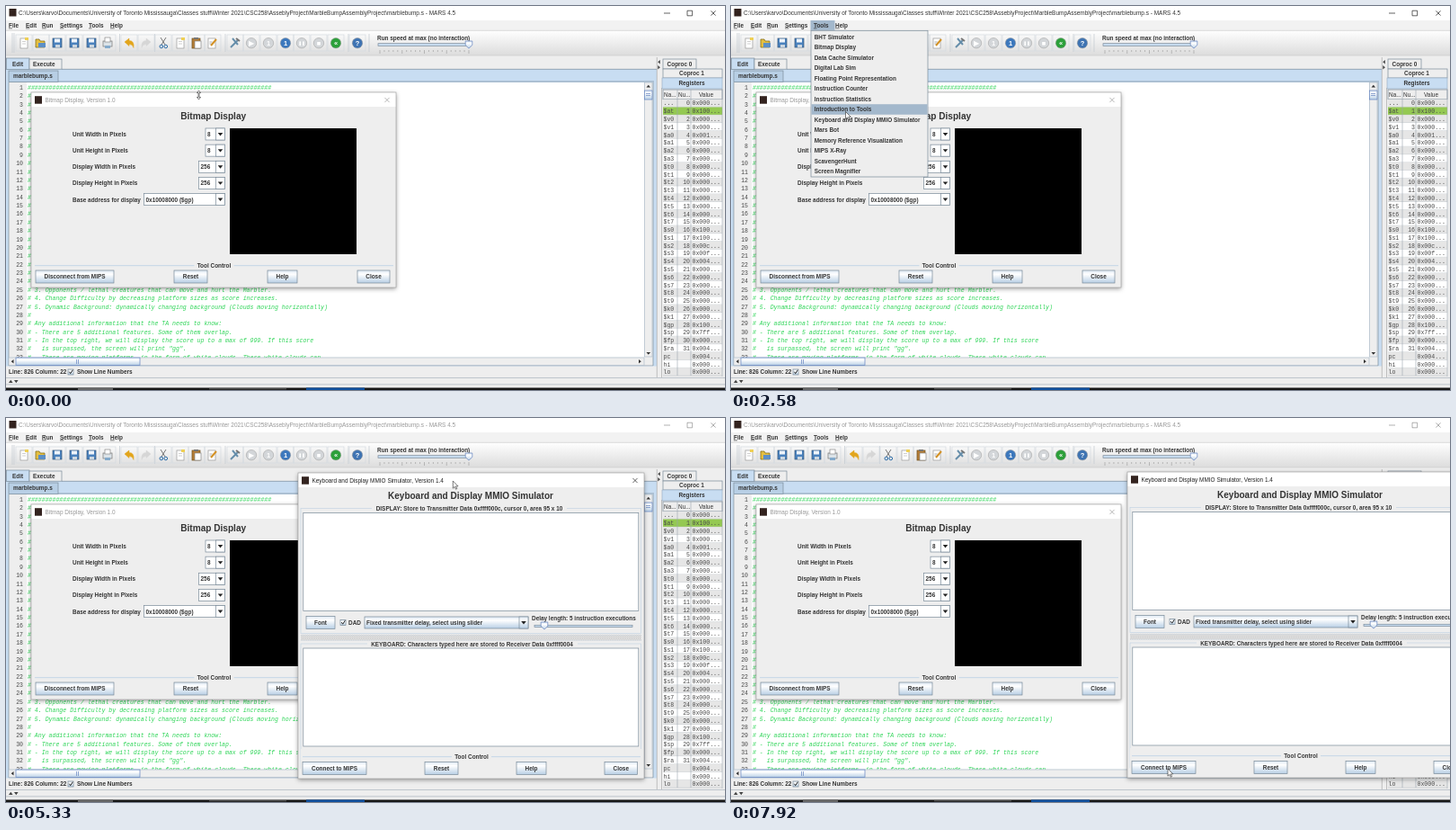
Write an HTML page that moves like this. It is 800 px wide and 427 px high and loops after 8 s.

```html
<!DOCTYPE html>
<html lang="en">
<head>
<meta charset="utf-8">
<title>Assembly editor</title>
<style>
html, body { margin: 0; width: 100%; height: 100%; overflow: hidden; background: #eee; }
svg { display: block; width: 100vw; height: 100vh; }
text { white-space: pre; font: bold 6.42px "Liberation Sans", Arial, sans-serif; fill: #333; }
text.plain { font-weight: normal; }
text.mono { font: 6.55px "Liberation Mono", "Courier New", monospace; fill: #4a4a4a; }
text.code { font-style: italic; fill: #2bd455; }
.u { text-decoration: underline; }
</style>
</head>
<body>
<svg id="stage" viewBox="0 0 800 427" preserveAspectRatio="none">
  <defs>
    <linearGradient id="ocean" x2="0" y2="1">
      <stop stop-color="#dde8f3"/><stop offset=".3" stop-color="#fff"/><stop offset="1" stop-color="#b8cfe5"/>
    </linearGradient>
    <linearGradient id="bar" x2="0" y2="1"><stop stop-color="#fff"/><stop offset="1" stop-color="#dcdcdc"/></linearGradient>
    <pattern id="bumps" width="2" height="2" patternUnits="userSpaceOnUse">
      <rect width="2" height="2" fill="#eee"/><rect width="1" height="1" fill="#bbb"/><rect x="1" y="1" width="1" height="1" fill="#ccc"/>
    </pattern>
    <filter id="shadow" x="-10%" y="-10%" width="120%" height="120%">
      <feDropShadow dx="0" dy="1.5" stdDeviation="2.5" flood-opacity=".4"/>
    </filter>
  </defs>
</svg>
<script>
const EDGE = "#7a8a99", BLUE = "#c8ddf2", PICK = "#a3b8cc";
const stage = document.getElementById("stage");
const rect = (x, y, w, h, fill, extra = "") => `<rect x="${x}" y="${y}" width="${w}" height="${h}" fill="${fill}" ${extra}/>`;
const box = (x, y, w, h, fill, stroke = EDGE) => rect(x, y, w, h, fill, `stroke="${stroke}" stroke-width=".7"`);
const path = (d, stroke, width = .7, fill = "none") => `<path d="${d}" fill="${fill}" stroke="${stroke}" stroke-width="${width}"/>`;
// y is the middle of the line of text
const text = (x, y, str, { cls = "", size = 6.42, anchor = "start", fill = "" } = {}) =>
  `<text x="${x}" y="${y + size * .36}" class="${cls}" text-anchor="${anchor}" style="font-size:${size}px;${fill && "fill:" + fill}">${str}</text>`;
const mid = (x, y, str, size = 6.42, cls = "") => text(x, y, str, { anchor: "middle", size, cls });
const mono = (x, y, str, anchor = "start", cls = "mono") => text(x, y, str, { cls, size: 6.55, anchor });
const button = (x, y, w, h, label) => box(x, y, w, h, "url(#ocean)") + mid(x + w / 2, y + h / 2, label);
const range = (n, fn) => Array.from({ length: n }, (_, i) => fn(i)).join("");
const cross = (x, y, color) => path(`M${x - 2.6} ${y - 2.6}l5.2 5.2m0-5.2l-5.2 5.2`, color, .7);
const check = (x, y) => box(x, y, 6, 6, "url(#ocean)") + path(`M${x + 1.3} ${y + 2.7}l1.4 2 2.6-4`, "#222", 1);
const combo = (x, y, w, value, fill = "#fff") => box(x, y, w, 13, fill) + box(x + w - 10, y, 10, 13, fill) +
  path(`M${x + w - 7.8} ${y + 5}h5.6l-2.8 3.4z`, "none", 0, "#222") + text(x + 2, y + 6.7, value);
const thumb = (x, y) => path(`M${x - 3.8} ${y - 4}h7.6v4.5l-3.8 3.6-3.8-3.6z`, "#6382bf", .7, "url(#ocean)");
const ruled = (x1, x2, y, label, half) => path(`M${x1} ${y}H${(x1 + x2) / 2 - half}M${(x1 + x2) / 2 + half} ${y}H${x2}`, "#b8cfe5", .8) +
  mid((x1 + x2) / 2, y, label);

function mainWindow() {
  const name = "marblebump.s";
  const title = String.raw`C:\Users\karvo\Documents\University of Toronto Mississauga\Classes stuff\Winter 2021\CSC258\AsseblyProject\MarbleBumpAssemblyProject\ `.trim() + name + " - MARS 4.5";
  const menus = { File: 3, Edit: 22, Run: 40, Settings: 60, Tools: 92, Help: 116 };
  return rect(0, 0, 800, 427, "#eee") + rect(0, 0, 800, 16, "#fff") + rect(3.5, 3, 8, 8.5, "#33231f") +
    group("title", text(14, 7.5, title, { cls: "plain", size: 6.48 }) +
      path("M732 8h7M758 5.2h5.6v5.6h-5.6z", "#222") + cross(787, 8, "#222")) +
    rect(0, 16, 800, 11, "#f2f2f2") + rect(88.5, 16, 27, 11, PICK, 'id="toolsTitle"') +
    Object.entries(menus).map(([m, x]) => text(x, 21.3, `<tspan class="u">${m[0]}</tspan>${m.slice(1)}`)).join("") +
    toolbar() + editor(name) + registers() + bottom();
}

function toolbar() {
  const icons = [
    [20, "page"], [39, "folder"], [57, "disk"], [76, "disk"], [95, "disk"], [113, "print"],
    [137, "undo", "#e2a51c"], [156, "redo", "#d6d6d6"], [175, "cut"], [194, "page"], [212, "paste"], [230, "edit"],
    [255, "tool"], [273, "dot", "#d3d6d9", "▶"], [292, "dot", "#d3d6d9", "1"], [311, "dot", "#3c78bd", "1"],
    [329, "dot", "#d3d6d9", "❚❚"], [348, "dot", "#d3d6d9", "■"], [367, "dot", "#2ca03a", "«"], [391, "dot", "#3f74b3", "?"]
  ];
  const shapes = {
    page: x => box(x - 4, 36, 8, 11, "#fff", "#999") + path(`M${x - 2} 39.5h4m-4 2.5h4`, "#bbb") + rect(x + 1, 35, 4, 3, "#eecf55"),
    folder: x => path(`M${x - 6} 46v-9h4l1 2h5v7z`, "#78640f", .7, "#e4bf42") + rect(x - 3, 41, 8, 5, "#5c8fc6"),
    disk: x => box(x - 5, 36, 10, 10, "#4b82bd", "#36567a") + rect(x - 3, 36.5, 6, 4, "#eef4fa") + rect(x - 2, 43, 5, 3, "#ccd6df"),
    print: x => box(x - 5, 39, 10, 6, "#dce3e8", "#777") + box(x - 3, 35, 6, 5, "#fff", "#888") + rect(x - 3, 44, 6, 3, "#84aacb"),
    undo: (x, c) => path(`M${x - 5} 40l5-4v2.5q6 0 5 8q-1-4-5-4v2z`, c, .5, c),
    redo: (x, c) => path(`M${x + 5} 40l-5-4v2.5q-6 0-5 8q1-4 5-4v2z`, c, .5, c),
    cut: x => path(`M${x - 3} 35l5 8m1-8l-5 8`, "#777", 1) + path(`M${x - 4} 45a1.8 1.8 0 1 0 3.6 0a1.8 1.8 0 1 0-3.6 0m5 0a1.8 1.8 0 1 0 3.6 0a1.8 1.8 0 1 0-3.6 0`, "#2b6ca8", 1),
    paste: x => box(x - 5, 36, 9, 11, "#b57d35", "#6d5022") + box(x - 2, 39, 7, 8, "#fff", "#888") + rect(x - 3, 35, 5, 2, "#777"),
    edit: x => box(x - 5, 36, 8, 11, "#fff", "#999") + path(`M${x - 2} 44l6-7`, "#d49123", 2) + path(`M${x - 3.5} 40h3m-3 2h2`, "#888"),
    tool: x => path(`M${x - 5} 46l8-8m-6-2l6 7`, "#668eaa", 2) + path(`M${x + 1} 36l4 3`, "#777", 2),
    dot: (x, c, mark) => `<circle cx="${x}" cy="41.2" r="5.7" fill="${c}" stroke="#999" stroke-width=".5"/>` +
      text(x, 41, mark, { anchor: "middle", size: mark.length > 1 ? 4.5 : 7.5, fill: "#fff" })
  };
  return rect(0, 27, 800, 28, "url(#bar)") + path("M0 27.3H800M0 55H800", "#ccc") +
    path("M7 30v22m2-22v22M126.5 31v20M165.5 31v20M244 31v20M381 31v20M404 31v20", "#c2c9d0") +
    icons.map(([x, kind, ...more]) => box(x - 9, 32, 18, 18, "none", "#d4dae0") + shapes[kind](x, ...more)).join("") +
    text(413, 36, "Run speed at max (no interaction)") + box(414, 41.7, 103, 2.6, BLUE) + thumb(515, 43) +
    path(range(21, i => `M${416 + i * 4.95} 49v${i % 5 ? 2 : 4}`), "#888", .5);
}

function editor(name) {
  const tail = [
    "# 3. Opponents / lethal creatures that can move and hurt the Marbler.",
    "# 4. Change Difficulty by decreasing platform sizes as score increases.",
    "# 5. Dynamic Background: dynamically changing background (Clouds moving horizontally)",
    "#",
    "# Any additional information that the TA needs to know:",
    "# - There are 5 additional features. Some of them overlap.",
    "# - In the top right, we will display the score up to a max of 999. If this score",
    '#   is surpassed, the screen will print "gg".',
    "# - There are moving platforms, in the form of white clouds. These white clouds can"
  ];
  const line = i => i === 0 ? "#".repeat(69) : i < 24 ? "#" : tail[i - 24];
  return rect(0, 70, 724, 343, BLUE) + box(.5, 58, 25.5, 12.5, BLUE) + text(7, 64.3, "Edit") +
    box(26, 59, 36, 11.2, "#eee") + text(30, 64.3, "Execute") + path("M62 70.3H724", EDGE) +
    box(3, 72, 55, 12.5, "#b8cfe5") + text(8, 78, name) + path("M58 84H721", EDGE) +
    rect(3, 85, 717, 315, "#eee") + rect(23, 85, 687, 305.5, "#fff") + path("M3 85V400H720V85", EDGE) +
    `<svg x="0" y="85" width="710" height="306" viewBox="0 85 710 306">` +
    range(33, i => mono(19, 90.5 + 9.375 * i, i + 1, "end") + mono(24, 90.5 + 9.375 * i, line(i), "start", "mono code")) + `</svg>` +
    box(710.5, 85, 8.5, 305, "#eee", "#aebdcb") + box(710.5, 94, 8.5, 10, "url(#ocean)", "#6382bf") + path("M712 97.5h5m-5 2h5", "#6382bf") +
    path("M712.5 90.5l2.3-2.8 2.3 2.8zM712.5 385l2.3 2.8 2.3-2.8z", "none", 0, "#333") +
    box(3, 391, 707, 8.5, "#eee", "#aebdcb") + box(11, 391, 138, 8.5, "url(#ocean)", "#6382bf") + path("M78.5 393v5m2-5v5", "#6382bf") +
    path("M8.5 393l-2.8 2.3 2.8 2.3zM704 393l2.8 2.3-2.8 2.3z", "none", 0, "#333") +
    rect(0, 400.5, 724, 13, "#eee") + text(3, 407, "Line: 826 Column: 22") + check(69, 404) + text(79, 407, "Show Line Numbers");
}

function registers() {
  const list = (p, a, b) => Array.from({ length: b - a + 1 }, (_, i) => `$${p}${a + i}`);
  const names = ["...", "$at", ...list("v", 0, 1), ...list("a", 0, 3), ...list("t", 0, 7), ...list("s", 0, 7), ...list("t", 8, 9),
    ...list("k", 0, 1), "$gp", "$sp", "$fp", "$ra", "pc", "hi", "lo"];
  const values = { $at: "100", $a0: "001", $s0: "100", $s1: "100", $s2: "00c", $s3: "00f", $s4: "004", $gp: "100", $sp: "7ff", $ra: "004", pc: "004" };
  const row = (n, i) => {
    const y = 103.7 + 8.79 * i;
    return rect(731, y, 66, 8.79, n === "$at" ? "#94c952" : i % 2 ? "#fff" : "#e6e6e6") + path(`M731 ${y + 8.6}h66`, "#b7bec5", .5) +
      mono(731.5, y + 4.4, n) + (i < 32 ? mono(761, y + 4.4, i, "end") : "") + mono(763.5, y + 4.4, `0x${values[n] || "000"}...`);
  };
  return rect(724, 57, 5.5, 356, "#eee") + path("M724.3 57V413M729.5 91V413", "#aaa") +
    path("M727.8 60l-2.6 2.2 2.6 2.2zM725.3 66l2.6 2.2-2.6 2.2z", "none", 0, "#444") +
    box(731, 59, 37, 11, "#eee") + mid(749.5, 64.5, "Coproc 0") + box(731, 70, 66, 10, "#eee") + mid(763, 75, "Coproc 1") +
    box(730, 80, 67, 12, BLUE, "#9bb0c6") + mid(763, 85.3, "Registers") +
    box(731, 93, 66, 10.7, "#eee") + text(732, 99, "Na...", { cls: "plain" }) + text(748, 99, "Nu...", { cls: "plain" }) +
    mid(779, 99, "Value", 6.42, "plain") +
    names.map(row).join("") + path("M747 93V411M762 93V411M797 92V412", "#9aa5af", .6);
}

function bottom() {
  return rect(0, 413, 800, 11.5, "#eee") + path("M0 413.5H800M0 420.8H800", "#aab4be") +
    path("M3 419l2.3-3.2 2.3 3.2zM9 416l2.3 3.2 2.3-3.2z", "none", 0, "#444") +
    rect(0, 424.5, 800, 2.5, "#171717") + rect(80, 424.5, 39, 2.5, "#666") + rect(226, 425.4, 86, .8, "#aaa", 'opacity=".6"') +
    rect(334, 424.5, 65, 2.5, "#0f4f9e");
}

const frame = (w, h, title, color) => `<g filter="url(#shadow)">${rect(0, 0, w, h, "#eee")}</g>` + rect(0, 0, w, 16, "#fff") +
  rect(4, 4.2, 8, 8.5, "#33231f") + text(15.5, 8.6, title, { cls: "plain", size: 6.43, fill: color }) +
  cross(w - 10, 8.5, color) + rect(0, 0, w, h, "none", 'stroke="#999" stroke-width=".6"');

function bitmapDialog() {
  const rows = [["Unit Width in Pixels", 222, "8"], ["Unit Height in Pixels", 222, "8"], ["Display Width in Pixels", 214.5, "256"],
    ["Display Height in Pixels", 214.5, "256"], ["Base address for display", 153.5, "0x10008000 ($gp)"]];
  return `<g transform="translate(28 96)">${frame(406, 217, "Bitmap Display, Version 1.0", "#999")}</g>` +
    mid(230.7, 122, "Bitmap Display", 10.1) +
    rows.map(([label, x, v], i) => text(74, 142.6 + 18.15 * i, label) + combo(x, 136 + 18.15 * i, 243.5 - x, v)).join("") +
    rect(249, 136, 141, 140, "#000") + ruled(32, 431, 288.7, "Tool Control", 22) +
    [[33, 87, "Disconnect from MIPS"], [187, 37, "Reset"], [291, 33, "Help"], [391, 36, "Close"]]
      .map(([x, w, s]) => button(x, 294, w, 14, s)).join("");
}

function keyboardDialog() {
  const area = y => box(3, y - 5, 378.5, 139, "none", "#c3d3e3") + box(5.8, y, 373, 109, "#fff");
  return frame(385, 340, "Keyboard and Display MMIO Simulator, Version 1.4", "#222") +
    mid(192, 25.4, "Keyboard and Display MMIO Simulator", 10) + area(44.5) + area(195) +
    rect(82, 37, 217, 6, "#eee") + mid(190.5, 40, "DISPLAY: Store to Transmitter Data 0xffff000c, cursor 0, area 95 x 10") +
    rect(77, 187.5, 234, 6, "#eee") + mid(193.5, 190.5, "KEYBOARD: Characters typed here are stored to Receiver Data 0xffff0004") +
    button(9, 159.5, 32, 14, "Font") + check(47, 163.5) + text(56, 166.7, "DAD") +
    combo(74, 160, 182, "Fixed transmitter delay, select using slider", "url(#ocean)") +
    text(260, 162, "Delay length: 5 instruction executions") + box(263, 169.3, 109, 2.3, BLUE) + thumb(274, 170) +
    rect(3, 180.5, 379, 5.5, "url(#bumps)") + path("M3 180.3h379m-379 6h379", "#bbc5cf", .5) +
    rect(3, 307, 379, 30, "#eee") + ruled(5, 381, 315.7, "Tool Control", 22) +
    [[5, 71, "Connect to MIPS"], [141, 37, "Reset"], [243, 33, "Help"], [341, 36.5, "Close"]]
      .map(([x, w, s]) => button(x, 321.5, w, 14, s)).join("");
}

const TOP = 28.5, STEP = 11.53;
function toolsMenu() {
  const items = ["BHT Simulator", "Bitmap Display", "Data Cache Simulator", "Digital Lab Sim", "Floating Point Representation",
    "Instruction Counter", "Instruction Statistics", "Introduction to Tools", "Keyboard and Display MMIO Simulator", "Mars Bot",
    "Memory Reference Visualization", "MIPS X-Ray", "ScavengerHunt", "Screen Magnifier"];
  return box(89, 27.3, 130, 162.7, "#eee") + rect(89.5, 0, 129, STEP, PICK, 'id="hover"') +
    items.map((s, i) => text(92.7, TOP + STEP * (i + .5), s)).join("");
}

function group(id, body) {
  return `<g id="${id}">${body}</g>`;
}
stage.insertAdjacentHTML("beforeend", mainWindow() + bitmapDialog() + group("menu", toolsMenu()) + group("keyboard", keyboardDialog()) +
  group("resize", path("M0-5l-2 2.5h1.5v5h-1.5l2 2.5 2-2.5h-1.5v-5h1.5z", "#222", .6, "#fff")) +
  group("arrow", path("M0 0V8.2L1.9 6.4 3.2 9.2 4.5 8.6 3.2 5.9H5.8Z", "#222", .6, "#fff")));

const MENU_OPEN = 700, MENU_CLOSE = 3900, DIALOG_OPEN = 4000;
// rows of [ms, x, y]
const pointer = [[0, 214.5, 99], [130, 214.5, 99], [620, 102, 21], [820, 102, 22], [1400, 126, 112], [1580, 127.5, 117], [2700, 127.5, 117.5],
  [3250, 128.5, 127], [3950, 128.5, 128], [4170, 143, 124], [4550, 357, 48], [4700, 357, 48], [5000, 425, 60], [5330, 496.5, 70],
  [5670, 577, 68], [6000, 594, 66], [6250, 591, 66], [6700, 591, 66], [7350, 490, 386], [7600, 486, 390], [8000, 486, 390]];
const dialog = [[0, 207, 41], [4750, 207, 41], [5000, 259, 51], [5330, 324, 61], [5670, 428, 63], [6000, 444, 60], [6250, 441, 60], [8000, 441, 60]];

function at(table, t) {
  const i = Math.max(1, table.findIndex(row => row[0] >= t));
  const [t0, x0, y0] = table[i - 1], [t1, x1, y1] = table[i];
  const k = (t - t0) / (t1 - t0);
  return [x0 + (x1 - x0) * k, y0 + (y1 - y0) * k];
}
const el = id => document.getElementById(id);
const show = (id, on) => el(id).setAttribute("visibility", on ? "visible" : "hidden");
const move = (id, [x, y]) => el(id).setAttribute("transform", `translate(${x} ${y})`);

function draw(now) {
  const t = Math.floor((now % 8000) * 12 / 1000 + .05) * 1000 / 12;
  const p = at(pointer, t), open = t >= MENU_OPEN && t < MENU_CLOSE;
  move("arrow", p);
  move("resize", p);
  move("keyboard", at(dialog, t).map(Math.round));
  show("resize", t < 130);
  show("arrow", t >= 130);
  show("menu", open);
  show("toolsTitle", open);
  const item = Math.floor((p[1] - TOP) / STEP);
  show("hover", open && item >= 0);
  el("hover").setAttribute("y", TOP + STEP * item);
  el("keyboard").setAttribute("opacity", Math.max(0, Math.min(1, .6 + (t - DIALOG_OPEN) / 440)));
  show("keyboard", t >= DIALOG_OPEN);
  el("title").setAttribute("opacity", t >= DIALOG_OPEN ? .5 : 1);
}
const start = performance.now();
(function tick() {
  draw(performance.now() - start);
  requestAnimationFrame(tick);
})();
</script>
</body>
</html>
```
